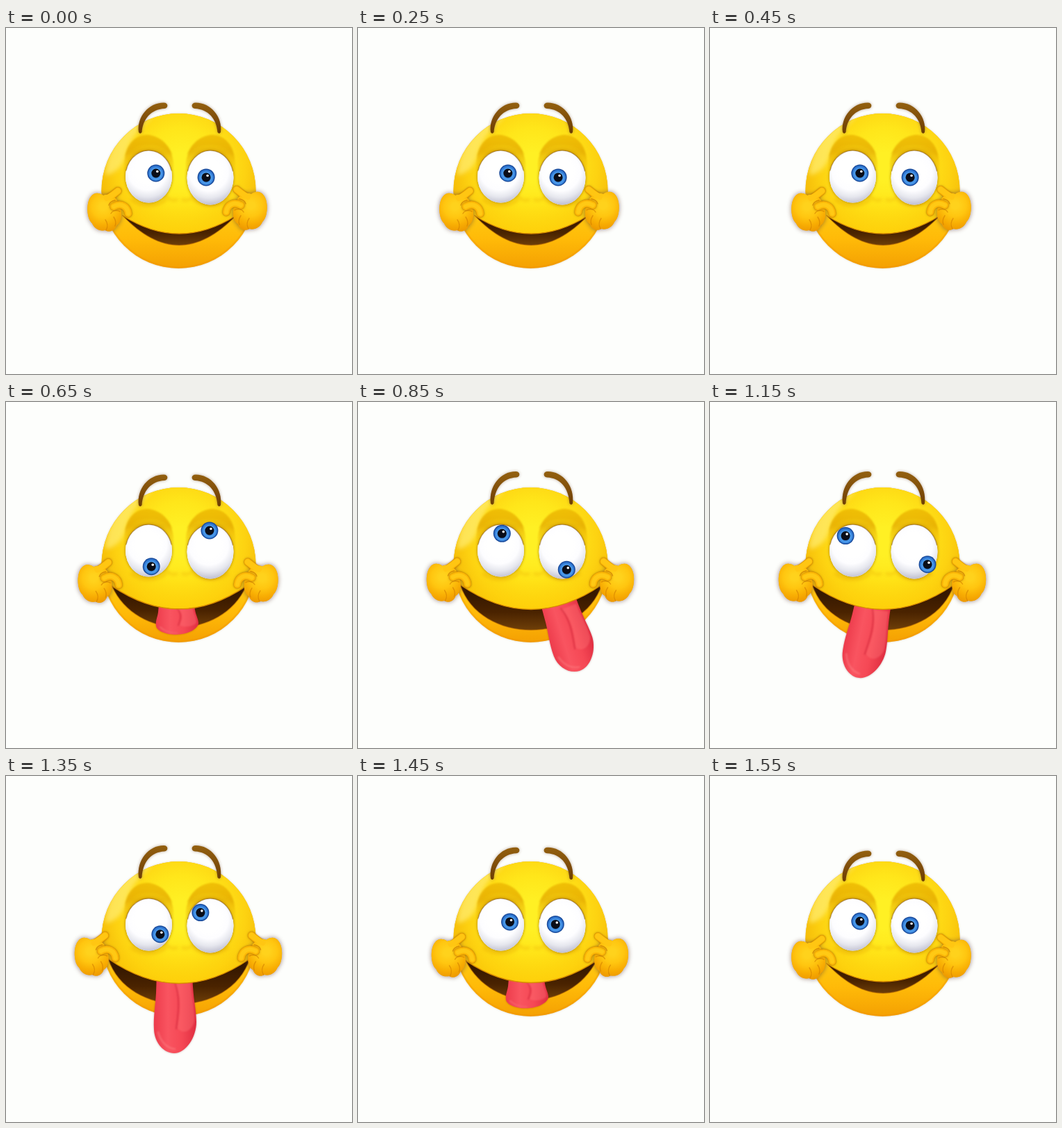
An HTML page with a canvas for the animation above (1600 ms loop, 498x498 px).

```html
<!DOCTYPE html>
<html lang="en">
<head>
<meta charset="utf-8">
<title>Silly face</title>
<style>
html, body { margin: 0; width: 100%; height: 100%; overflow: hidden; background: #fdfefc; }
canvas { display: block; }
</style>
</head>
<body>
<canvas id="stage" width="498" height="498"></canvas>
<script>
const ctx = document.getElementById('stage').getContext('2d');
const LOOP = 1600, STEP = 50;

// Keyframes as [time, value] pairs
const OPEN = [[490, 0], [600, .38], [650, .74], [710, 1], [1360, 1], [1450, .62], [1550, 0]];
const BROW_LIFT = [[550, 0], [650, .4], [750, 1], [1360, 1], [1450, .62], [1550, 0]];
const TONGUE_OUT = [[590, 0], [650, .37], [750, .8], [850, .92], [1150, 1], [1350, 1], [1420, .65], [1500, 0]];
const TONGUE_X = [[650, 246], [850, 292], [1150, 234], [1350, 243]];
const TONGUE_TURN = [[650, 0], [850, -.3], [1150, .2], [1350, 0]];

// Each pupil swings one way around its eye, then back; angles in degrees
const LEFT_SPIN = [[470, -27], [650, 82], [850, 273], [990, 325], [1150, 243], [1350, 41], [1500, -27]];
const RIGHT_SPIN = [[470, 190], [650, 268], [850, 436], [990, 484], [1150, 403], [1350, 234], [1500, 190]];
const LEFT_REACH = [[470, 11], [650, 23], [1150, 24], [1350, 21], [1500, 11]];
const RIGHT_REACH = [[470, 6], [650, 31], [850, 26], [1150, 26], [1350, 24], [1500, 6]];

const mix = (a, b, k) => a + (b - a) * k;

// Slope at a key: level at the ends and at turning points
function slope(keys, i) {
  if (i === 0 || i === keys.length - 1) return 0;
  const [[t0, a], [, b], [t1, c]] = keys.slice(i - 1, i + 2);
  return (b - a) * (c - b) <= 0 ? 0 : (c - a) / (t1 - t0);
}

// Smooth curve through the keys
function sample(keys, t) {
  if (t <= keys[0][0]) return keys[0][1];
  const i = keys.findIndex(key => key[0] >= t);
  if (i < 0) return keys[keys.length - 1][1];
  const [t0, a] = keys[i - 1], [t1, b] = keys[i];
  const span = t1 - t0, k = (t - t0) / span, j = 1 - k;
  return mix(a, b, k * k * (3 - 2 * k))
    + span * k * j * (j * slope(keys, i - 1) - k * slope(keys, i));
}

function shade(gradient, colors) {
  colors.forEach((c, i) => gradient.addColorStop(i / (colors.length - 1), c));
  return gradient;
}
const linear = (x0, y0, x1, y1, ...colors) => shade(ctx.createLinearGradient(x0, y0, x1, y1), colors);
const radial = (x, y, r0, r1, ...colors) => shade(ctx.createRadialGradient(x, y, r0, x, y, r1), colors);

function ellipse(x, y, rx, ry, fill) {
  ctx.beginPath();
  ctx.ellipse(x, y, rx, ry, 0, 0, 7);
  ctx.fillStyle = fill;
  ctx.fill();
}

function stroke(d, color, width) {
  ctx.strokeStyle = color;
  ctx.lineWidth = width;
  ctx.lineCap = ctx.lineJoin = 'round';
  ctx.stroke(new Path2D(d));
}

function fill(d, color) {
  ctx.fillStyle = color;
  ctx.fill(new Path2D(d));
}

function group(draw) {
  ctx.save();
  draw();
  ctx.restore();
}

function glow(color, blur) {
  ctx.shadowColor = color;
  ctx.shadowBlur = blur;
}

// Draws once as is and once flipped about the vertical line x = axis
function mirrored(axis, draw) {
  group(() => draw(0));
  group(() => {
    ctx.translate(2 * axis, 0);
    ctx.scale(-1, 1);
    draw(1);
  });
}

function upperLip(open) {
  const x0 = mix(168, 147, open), x1 = mix(331, 351, open);
  const y = mix(270, 263, open), dip = mix(322, 334, open);
  return { x0, x1, y, dip, curve: `M${x0} ${y}Q249 ${dip} ${x1} ${y}` };
}

function drawHead(open) {
  const { x0, x1, y, dip } = upperLip(open);
  group(() => {
    glow('rgba(150,130,90,.35)', 3);
    ellipse(248.5, 234.5, 111, 111.5, linear(0, 262, 0, 346, '#ffcb10', '#ffba08', '#f4a002'));
  });
  group(() => {
    ctx.beginPath();
    ctx.ellipse(248.5, 234.5, 111, 111.5, 0, 0, 7);
    ctx.clip();
    ctx.lineWidth = 5;
    ctx.strokeStyle = 'rgba(238,145,0,.35)';
    ctx.stroke();

    const dome = `M100 ${y}L100 90H400V${y}H${x1}Q249 ${dip} ${x0} ${y}Z`;
    fill(dome, radial(252, 200, 20, 130, '#fff024', '#ffe61a', '#fdd211', '#f2b305'));
    fill(dome, linear(0, 235, 0, 296, 'rgba(255,214,8,0)', 'rgba(255,208,6,.55)'));

    // Gloss on the upper left
    group(() => {
      ctx.filter = 'blur(3px)';
      fill('M143 212C144 172 170 139 212 127C190 146 178 160 171 188C165 204 153 210 143 212Z', 'rgba(255,240,125,.65)');
    });
  });
}

function drawMouth(open, t) {
  const { x0, x1, y, curve } = upperLip(open);
  const cx = mix(222, 176, open), cy = mix(327, 350, open);
  const bottom = `C${498 - cx} ${cy} ${cx} ${cy} ${x0} ${y}`;
  fill(`${curve}${bottom}Z`, linear(0, 276, 0, mix(314, 329, open), '#361800', '#4a2300', '#704009'));
  stroke(`M${x1} ${y}${bottom}`, 'rgba(190,110,0,.45)', 1.5);
  group(() => {
    ctx.clip(new Path2D(`${curve}L498 ${y}V498H0V${y}Z`));
    drawTongue(t);
  });
  stroke(curve, '#d98d00', 1.4);
}

function drawTongue(t) {
  const out = sample(TONGUE_OUT, t);
  if (out < .03) return;
  ctx.translate(sample(TONGUE_X, t), 297);
  ctx.rotate(sample(TONGUE_TURN, t));
  ctx.scale(1, out);
  group(() => {
    glow('rgba(100,10,10,.35)', 3);
    fill('M-26-15L-27 15C-28 35-31 48-30 68C-29 88-15 102-1 102C16 102 31 79 31 57C31 39 26 25 25-15Z',
      linear(-30, 0, 30, 0, '#ed3c4c', '#f95460', '#f54855', '#e12f42'));
  });
  group(() => {
    ctx.filter = 'blur(1px)';
    fill('M0 2C12 25 6 48 4 66C11 75 23 72 28 57C29 37 24 22 23 0Z', 'rgba(255,116,120,.38)');
    stroke('M0 0C9 24 4 48 2 67', 'rgba(190,22,45,.5)', 1.6);
    stroke('M-24 72C-20 86-11 95 0 96', 'rgba(255,145,145,.35)', 3);
  });
}

function drawSockets() {
  mirrored(250, () => {
    group(() => {
      ctx.filter = 'blur(1px)';
      fill('M170 204C169 172 184 154 203 154C222 155 238 169 241 194C242 221 234 239 228 246L178 238Z',
        linear(0, 152, 0, 205, 'rgba(238,184,0,.6)', 'rgba(226,166,0,.7)', 'rgba(240,184,0,.15)'));
      fill('M171 186C175 164 187 155 204 154C219 155 234 167 240 183C227 171 218 167 204 168C188 168 178 176 171 186Z', 'rgba(232,176,0,.35)');
    });
    group(() => {
      ctx.filter = 'blur(2px)';
      stroke('M230 241C235 248 241 249 246 247', 'rgba(225,155,0,.35)', 3);
      stroke('M181 247C194 258 217 258 230 247', 'rgba(228,160,0,.4)', 4);
    });
  });
}

function drawEye(x, y, rx, ry, px, py) {
  group(() => {
    glow('rgba(140,85,0,.7)', 4);
    ellipse(x, y, rx, ry, '#fff');
  });
  ellipse(x, y, rx, ry, radial(x - 2, y - 9, 18, 48, '#fff', '#fdfdff', '#e6e7ee', '#c0c0d0'));
  ctx.beginPath();
  ctx.ellipse(x, y, rx, ry, 0, Math.PI * 1.08, Math.PI * 1.92);
  ctx.strokeStyle = 'rgba(130,80,10,.5)';
  ctx.lineWidth = 1.3;
  ctx.stroke();

  ellipse(px, py, 12.5, 12.5, '#1b4c9c');
  ellipse(px, py, 11, 11, radial(px, py + 1, 4, 11, '#1d5db4', '#4f9fee', '#2c73cf'));
  ellipse(px, py, 6.5, 6.5, '#0a0d18');
  ellipse(px + 2, py - 2.5, 1.8, 1.8, '#fff');
}

function pupil(x, y, spin, reach, t) {
  const angle = sample(spin, t) * Math.PI / 180, r = sample(reach, t);
  return [x + r * Math.cos(angle), y + r * Math.sin(angle)];
}

function drawEyes(t) {
  drawEye(205.5, 214, 33.5, 37.5, ...pupil(206, 214, LEFT_SPIN, LEFT_REACH, t));
  drawEye(294, 215.5, 33.5, 39, ...pupil(294, 216, RIGHT_SPIN, RIGHT_REACH, t));
}

function drawBrows(lift) {
  const top = 107.5 - 7.5 * lift, foot = 150 - 4 * lift;
  const brow = `M191 ${foot}C188 ${top + 21} 205 ${top} 227 ${top}`
    + `C234 ${top} 234 ${top + 8} 228 ${top + 8.5}`
    + `C209 ${top + 9.5} 197 ${top + 23} 195.5 ${foot}Q193 ${foot + 3.5} 191 ${foot}Z`;
  mirrored(250, () => {
    glow('rgba(120,80,50,.5)', 4);
    fill(brow, linear(0, top, 0, 152, '#93600f', '#804e0a', '#6b3c03'));
  });
}

// A rounded finger lying over a soft dark edge
function finger(d, width) {
  group(() => {
    glow('rgba(130,70,0,.6)', 3);
    stroke(d, '#dc9200', width);
  });
  stroke(d, '#fbb808', width - 1);
  stroke(d, '#ffc914', width - 5);
}

function drawHands(open) {
  const fist = 'M140 241C149 237 158 243 163 253C168 264 167 280 159 284C157 291 149 295 143 291'
    + 'C134 293 127 288 124 281C116 274 115 252 122 243C127 236 134 237 140 241Z';
  mirrored(246.5, right => {
    ctx.translate(-mix(0, right ? 21.5 : 18.5, open), -mix(right ? 2 : 0, 5, open));
    group(() => {
      glow('rgba(95,60,55,.65)', 7);
      fill(fist, '#f5a900');
    });
    finger('M142 249Q152 242 161 234.5', 11);
    fill(fist, radial(140, 257, 5, 38, '#ffd21c', '#ffc610', '#f8ad03', '#ec9600'));
    stroke('M145 245Q153 241 161 234.5', '#ffc612', 8);
    stroke('M164 264C158 261 153 263 151 267', 'rgba(206,123,0,.6)', 1.5);
    stroke('M157 285C159 280 157 275 155 272M144 291C147 286 146 280 143 276', 'rgba(206,123,0,.6)', 1.4);
    finger('M155 257C166 251 175 257 176 267', 11);
    stroke('M148 255C149 251 152 249 157 248', 'rgba(196,115,0,.65)', 1.5);
  });
}

function draw(t) {
  const open = sample(OPEN, t);
  ctx.fillStyle = '#fdfefc';
  ctx.fillRect(0, 0, 498, 498);
  drawHead(open);
  drawSockets();
  drawEyes(t);
  drawMouth(open, t);
  drawBrows(sample(BROW_LIFT, t));
  drawHands(open);
}

function tick(now) {
  draw(Math.floor(now % LOOP / STEP) * STEP);
  requestAnimationFrame(tick);
}
tick(0);
</script>
</body>
</html>
```
